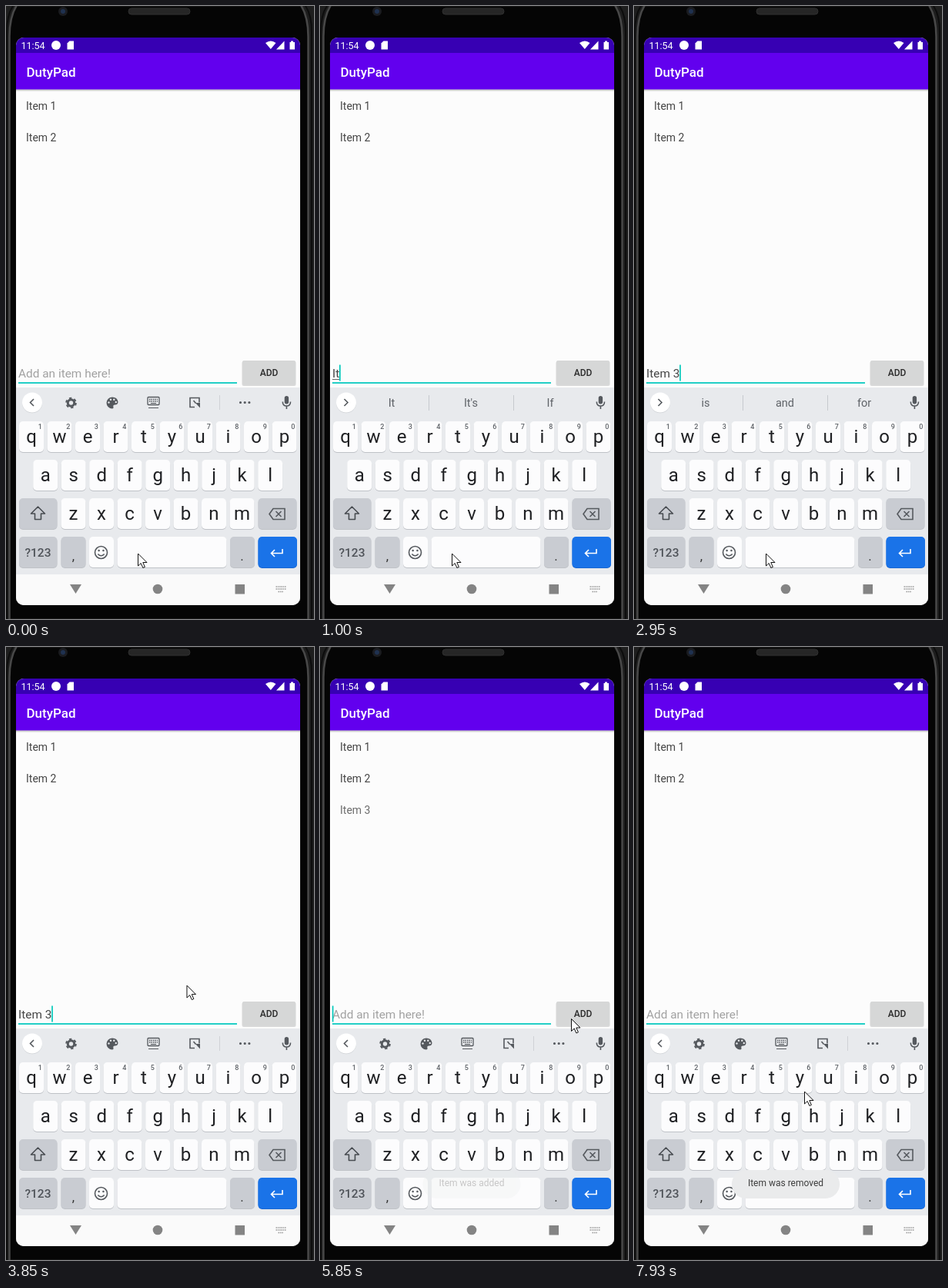
Animation of 400x797 px, one loop 8000 ms. Source, as an HTML page:

```html
<!DOCTYPE html>
<html lang="en">
<head>
<meta charset="utf-8">
<title>To-do list on a phone</title>
<style>
html, body { margin: 0; width: 100%; height: 100%; overflow: hidden; background: #000; }
svg { display: block; width: 400px; height: 797px; font-family: Roboto, Inter, sans-serif; }
text { white-space: pre; }
.mid { text-anchor: middle; }
.ink { fill: none; stroke: #55595e; stroke-width: 1.6; }
.med { font-weight: 500; }
</style>
</head>
<body>
<svg viewBox="0 0 400 797">
  <defs>
    <clipPath id="screen"><rect x="13" y="41" width="369" height="738" rx="10"/></clipPath>
    <linearGradient id="drop" x2="0" y2="1">
      <stop stop-color="#000" stop-opacity=".25"/><stop offset="1" stop-color="#000" stop-opacity="0"/>
    </linearGradient>
  </defs>

  <!-- phone body -->
  <rect width="400" height="797" fill="#1e1e1e"/>
  <path d="M4.500 798V40Q4.500 14 14 -1H383Q392.500 14 392.500 40V798z" fill="#050505" stroke="#484848" stroke-width="2.500"/>
  <path d="M1 797V34Q1 12 9 0M397 797V34Q397 12 389 0" fill="none" stroke="#0c0c0c" stroke-width="2"/>
  <circle cx="74" cy="7" r="6" fill="#1b1c20"/>
  <circle cx="74" cy="7" r="3" fill="#1f3150"/>
  <rect x="159" y="3" width="80" height="8" rx="4" fill="#262626" stroke="#303030"/>

  <g clip-path="url(#screen)">
    <rect x="13" y="41" width="369" height="738" fill="#fcfcfc"/>
    <rect x="13" y="41" width="369" height="21" fill="#3700b3"/>
    <rect x="13" y="61" width="369" height="47.500" fill="#6200ee"/>
    <rect x="13" y="108.500" width="369" height="3" fill="url(#drop)"/>

    <g fill="#fff">
      <text x="19.500" y="55.500" font-size="12.500">11:54</text>
      <circle cx="65" cy="51" r="6"/>
      <path d="M82.500 45.500h5.500v11h-8.500v-8z"/>
      <path d="M337 48q7-5 13.500 0l-6.700 8zM351 56.500h10.500V45.500zM368.500 47h1.500v-1.500h3V47h2v9.500h-6.500z"/>
      <text x="26.500" y="91.500" font-size="17" class="med">DutyPad</text>
    </g>

    <g font-size="14" fill="#444">
      <text x="26" y="135">Item 1</text>
      <text x="26" y="176">Item 2</text>
      <text id="added" x="26" y="217">Item 3</text>
    </g>

    <!-- input row -->
    <g font-size="15.400">
      <text id="hint" x="16" y="483" fill="#a1a1a1">Add an item here!</text>
      <text id="entry" x="16" y="483" fill="#454545"></text>
    </g>
    <rect id="mark" x="16" y="485" height="1" fill="#666"/>
    <rect x="16" y="489" width="284" height="2" fill="#22cfc6"/>
    <rect id="caret" y="466.500" width="1.700" height="21" fill="#03c9bb"/>
    <rect id="shade" x="306.500" y="461.500" width="70" height="32.500" rx="2.500" fill="#000" opacity=".14"/>
    <rect id="button" x="307" y="461" width="69" height="31.500" rx="2" fill="#d6d7d7"/>
    <text class="mid med" x="341.500" y="480.500" font-size="12" fill="#2c2c2c">ADD</text>

    <!-- keyboard -->
    <rect x="13" y="496" width="369" height="243" fill="#e8eaed"/>
    <circle cx="34" cy="516.300" r="13" fill="#cdd0d4"/>
    <circle cx="34" cy="515.500" r="13" fill="#fff"/>
    <path id="chevron" class="ink" d="M36 511l-4.500 4.500 4.500 4.500"/>
    <g id="tools" class="ink">
      <circle cx="84.500" cy="516" r="4.200" stroke-width="3"/>
      <circle cx="84.500" cy="516" r="6.300" stroke-width="2" stroke-dasharray="3.300"/>
      <path d="M138 508.500a7.500 7.500 0 1 0 0 15q2 0 1.500-2-1-3 2-3 4 0 4-4-1-6-7.500-6z" fill="#55595e" stroke="none"/>
      <g fill="#e8eaed" stroke="none">
        <circle cx="133.500" cy="515.500" r="1.200"/><circle cx="136" cy="511.800" r="1.200"/>
        <circle cx="140.300" cy="511.800" r="1.200"/><circle cx="142.800" cy="515" r="1.200"/>
      </g>
      <rect x="184" y="508.500" width="15" height="10" rx="1" stroke-width="1.300"/>
      <path d="M186 511.500h11M186 514h11" stroke-width="1.300" stroke-dasharray="1.500 1"/>
      <path d="M188 516.500h7M185 522.500h13" stroke-width="1.200"/>
      <path d="M245 521.500h-6v-12h12v6M243.500 513l3 3.500"/>
      <path d="M246 516h6v6.500z" fill="#55595e" stroke="none"/>
      <path d="M277.500 506v19" stroke="#cfd2d6" stroke-width="1"/>
      <path d="M304.500 515.500h12" stroke-width="3.200" stroke-linecap="round" stroke-dasharray="0 5.700"/>
    </g>
    <g id="words" font-size="14.500" fill="#5f6368" class="mid">
      <path d="M141.500 506v20M251.500 506v20" stroke="#c6c9ce"/>
      <text x="93" y="521"></text><text x="196" y="521"></text><text x="299" y="521"></text>
    </g>
    <rect x="361.700" y="507" width="5.400" height="10.500" rx="2.700" fill="#55595e"/>
    <path class="ink" d="M359.300 514.500q0 5.500 5.100 5.500t5.100-5.500M364.400 520v4"/>

    <g id="keys"></g>

    <path id="shift" d="M41.500 651l-9 9h5v7.500h8v-7.500h5z" stroke="#484c51" stroke-width="1.600" stroke-linejoin="round"/>
    <g class="ink">
      <path d="M342 660.500l5-7h15v14h-15zM350.500 657l7 7M357.500 657l-7 7"/>
      <circle cx="123.500" cy="710.500" r="8"/>
      <path d="M119.300 712.500q4.200 4.500 8.400 0"/>
      <path d="M120.600 708h.1M126.400 708h.1" stroke-width="2.400" stroke-linecap="round"/>
      <path d="M359 706v5.500h-14M349 707l-4.500 4.500 4.500 4.500" stroke="#fff"/>
    </g>
    <text class="mid med" x="41.500" y="716" font-size="15.500" fill="#4f5359">?123</text>
    <g class="mid" font-size="17" fill="#333"><text x="87.500" y="721">,</text><text x="306.500" y="721">.</text></g>

    <!-- navigation bar -->
    <rect x="13" y="739" width="369" height="40" fill="#fafafa"/>
    <g fill="#848484">
      <path d="M83 752h15l-7.500 12z"/>
      <circle cx="197" cy="758" r="6.300"/>
      <rect x="297.500" y="752" width="12.500" height="12.500"/>
      <path d="M350.500 755h13M350.500 758h13M353.500 761.500h7" stroke="#999" stroke-width="1.500" stroke-dasharray="1.500 .8"/>
    </g>

    <g id="toast">
      <rect y="680" height="37" rx="18.500" fill="#eaebec"/>
      <text class="mid" x="197" y="701" font-size="12" fill="#3c3c3c"></text>
    </g>
    <path id="mouse" d="M0 0V16l3.700-3.500 2.700 6 2.500-1.100-2.600-5.900h5.200z" fill="#fff" stroke="#111" stroke-linejoin="round"/>
  </g>
</svg>
<script>
const $ = id => document.getElementById(id);
const LOOP = 8000;

// Keys
const key = (x, y, w, fill = '#fcfcfd', edge = '#bfc2c7') =>
  `<rect x="${x}" y="${y + 1}" width="${w}" height="40" rx="5" fill="${edge}"/>` +
  `<rect x="${x}" y="${y}" width="${w}" height="40" rx="5" fill="${fill}"/>`;
const GREY = '#c9ccd2';
let markup = '';
[['qwertyuiop', 33], ['asdfghjkl', 51.2], ['zxcvbnm', 87.5]].forEach(([row, left], r) => {
  [...row].forEach((ch, i) => {
    const x = left + 36.5 * i, y = 540 + 50 * r;
    markup += key(x - 16, y, 32) +
      `<text class="mid letter" x="${x}" y="${y + 27.6}" font-size="24" fill="#1f2023">${ch}</text>`;
    if (!r) markup += `<text class="mid med" x="${x + 11.3}" y="549.800" font-size="9" fill="#5f6368">${(i + 1) % 10}</text>`;
  });
});
markup += key(17, 640, 49.5, GREY) + key(327.5, 640, 50, GREY) + key(17, 690, 49.5, GREY) +
  key(71.5, 690, 32, GREY) + key(108, 690, 32) + key(144.5, 690, 142) +
  key(291, 690, 32, GREY) + key(327.5, 690, 50.5, '#1a73e8', '#1967d2');
$('keys').innerHTML = markup;
const letters = document.querySelectorAll('.letter');
const slots = document.querySelectorAll('#words text');
const [pill, note] = $('toast').children;

// Timelines: [start, value]
const typed = [[0, ''], [550, 'I'], [850, 'It'], [1470, 'Ite'], [1770, 'Item'], [2500, 'Item '], [2800, 'Item 3'], [5700, '']];
const marked = [[0, 0], [1000, 2], [1620, 3], [1920, 4], [2500, 0]];
const offers = [[0, "It|It's|If"], [1920, 'Item|Items|Itemized'], [2650, 'is|and|for']];
const caretOn = [[0, 0], [140, 1], [3390, 0], [3850, 1], [4320, 0], [4820, 1], [5400, 0], [5700, 1], [6200, 0], [6770, 1], [7500, 0]];
const itemAlpha = [[0, 0], [5700, .2], [5850, .78], [5990, 1], [7350, .4], [7500, 0]];
const toastAlpha = [[0, 0], [5850, .28], [5990, 1], [7350, .4], [7500, .2], [7640, 1]];

// Pointer moves: start, steps, step time, ease power, curve points
const moves = [
  [3700, 8, 141, 1, [171.5, 712], [230, 235], [430, 235], [326.5, 483.5]],
  [5990, 8, 130, 2, [326.5, 483.5], [200, 350], [60, 212], [56, 212]],
  [7500, 4, 143, 1, [56, 212], [70, 300], [150, 500], [221.5, 578]],
];

const at = (line, t) => line.reduce((v, [start, value]) => t >= start ? value : v, null);
const bezier = (u, a, b, c, d) =>
  a.map((p, i) => p * (1 - u) ** 3 + 3 * b[i] * (1 - u) ** 2 * u + 3 * c[i] * (1 - u) * u * u + d[i] * u ** 3);
const set = (id, name, value) => $(id).setAttribute(name, value);

function pointer(t) {
  let pos = moves[0][4];
  for (const [start, steps, dt, power, ...curve] of moves) {
    if (t < start) break;
    const p = Math.min(1, (Math.floor((t - start) / dt) + 1) / steps);
    pos = bezier(1 - (1 - p) ** power, ...curve);
  }
  return pos;
}

function draw(t) {
  const text = at(typed, t), entry = $('entry');
  if (entry.textContent !== text) entry.textContent = text;
  const size = n => n ? entry.getSubStringLength(0, n) : 0;
  set('hint', 'opacity', text ? 0 : 1);
  set('mark', 'width', size(at(marked, t)));
  set('caret', 'x', 15.8 + size(text.length));
  set('caret', 'opacity', at(caretOn, t));

  const caps = t >= 550 && t < 700;
  letters.forEach(el => {
    el.textContent = caps ? el.textContent.toUpperCase() : el.textContent.toLowerCase();
  });
  set('shift', 'fill', caps ? '#484c51' : 'none');

  const offering = t >= 1000 && t < 3240;
  at(offers, t).split('|').forEach((word, i) => { slots[i].textContent = word; });
  set('words', 'opacity', +offering);
  set('tools', 'opacity', +!offering);
  set('chevron', 'transform', offering ? 'matrix(-1 0 0 1 67.500 0)' : '');

  const pressed = t >= 5400 && t < 5700;
  set('button', 'fill', pressed ? '#c6c7c7' : '#d6d7d7');
  set('shade', 'opacity', pressed ? .25 : .14);
  set('added', 'opacity', at(itemAlpha, t));

  note.textContent = t < 7500 ? 'Item was added' : 'Item was removed';
  const w = note.getComputedTextLength() + 42;
  pill.setAttribute('x', 197 - w / 2);
  pill.setAttribute('width', w);
  set('toast', 'opacity', at(toastAlpha, t));
  set('mouse', 'transform', `translate(${pointer(t)})`);
}

function tick() {
  draw(performance.now() % LOOP);
  requestAnimationFrame(tick);
}
tick();
</script>
</body>
</html>
```
